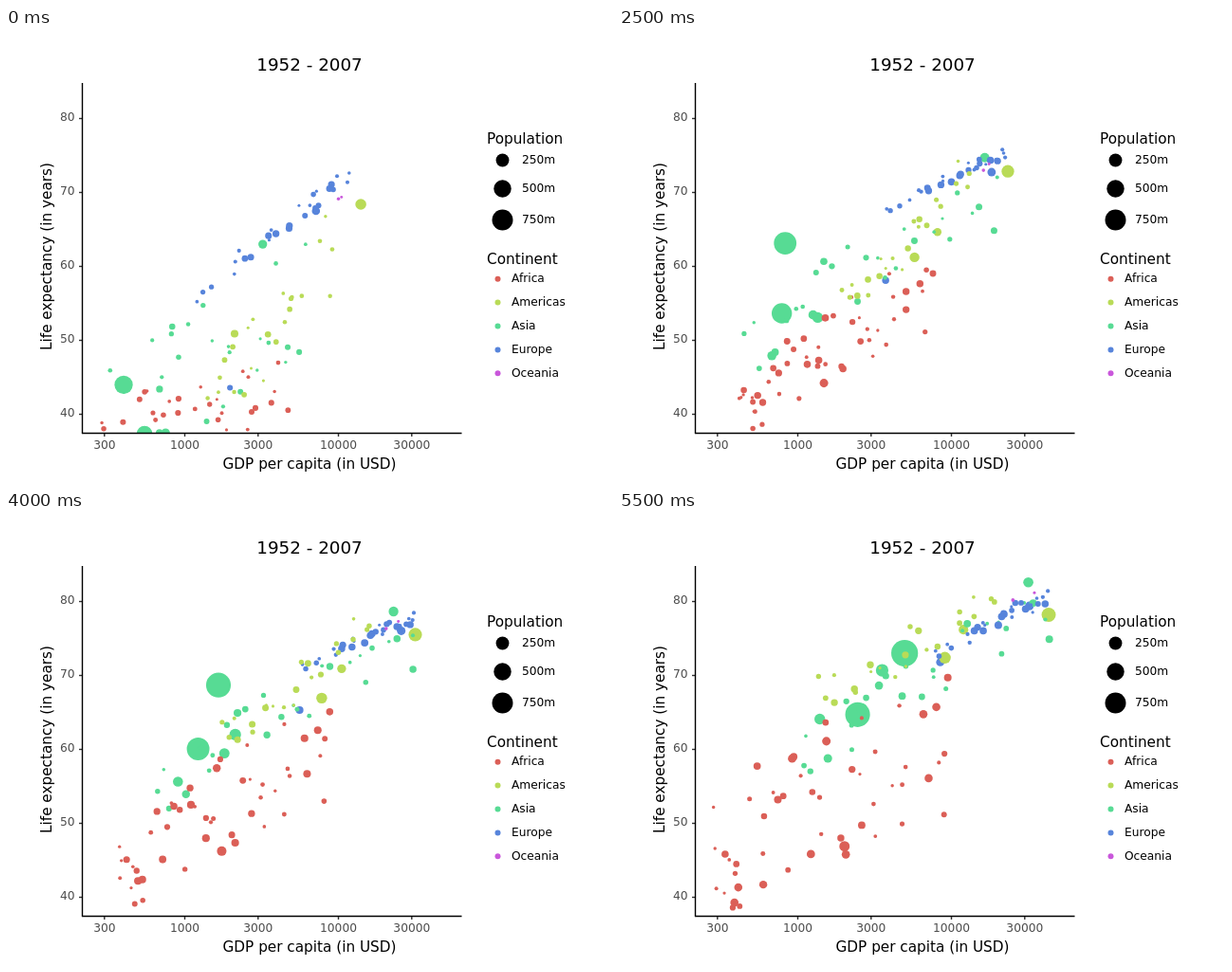
Animation of 640 by 480 pixels, one loop 6000 ms. Source, as an HTML page with a canvas:

```html
<!DOCTYPE html>
<html lang="en">
<head>
<meta charset="utf-8">
<title>Life expectancy and GDP</title>
<style>
html, body { margin: 0; width: 100%; height: 100%; overflow: hidden; background: #fff; }
canvas { display: block; }
</style>
</head>
<body>
<canvas id="stage" width="640" height="480"></canvas>
<script>
const ctx = document.getElementById('stage').getContext('2d');
const STEPS = 12, STEP_MS = 500;
const FONT = '"DejaVu Sans", sans-serif';
const COLORS = { Africa: '#db5f57', Americas: '#b9db57', Asia: '#57db94', Europe: '#5784db', Oceania: '#c957db' };

// The large bubbles: population in millions at both ends, then [step, gdp, life].
const giants = [
  { group: 'Asia', pop: [556, 1319],
    keys: [[0, 400, 44], [1, 576, 50.5], [2, 488, 44.5], [3, 613, 58.4], [6, 962, 65.5], [8, 1656, 68.7], [11, 4959, 73]] },
  { group: 'Asia', pop: [372, 1110],
    keys: [[0, 547, 37.4], [4, 724, 50.7], [6, 856, 56.6], [9, 1459, 61.8], [11, 2452, 64.7]] },
  { group: 'Asia', pop: [82, 224], keys: [[0, 750, 37.5], [6, 1517, 56.2], [11, 3541, 70.7]] },
  { group: 'Asia', pop: [41, 169], keys: [[0, 685, 43.4], [11, 2606, 65.5]] },
  { group: 'Asia', pop: [47, 150], keys: [[0, 684, 37.5], [6, 677, 50], [11, 1391, 64.1]] },
  { group: 'Asia', pop: [86, 127], keys: [[0, 3217, 63], [4, 14779, 73.4], [11, 31656, 82.6]] },
  { group: 'Europe', pop: [69, 82], keys: [[0, 7144, 67.5], [6, 22032, 73.8], [11, 32170, 79.4]] },
  { group: 'Europe', pop: [22, 71], keys: [[0, 1969, 43.6], [6, 4241, 61], [11, 8458, 71.8]] },
  { group: 'Africa', pop: [33, 135], keys: [[0, 1077, 36.3], [6, 1577, 45.8], [11, 2014, 46.9]] },
  { group: 'Americas', pop: [57, 190], keys: [[0, 2109, 50.9], [6, 7031, 63.3], [11, 9066, 72.4]] },
  { group: 'Americas', pop: [30, 109], keys: [[0, 3478, 50.8], [6, 9611, 67.4], [11, 11978, 76.2]] },
  { group: 'Americas', pop: [157, 301], keys: [[0, 13990, 68.4], [11, 42952, 78.2]] }
];

// All other countries, spread from the poorest to the richest of their continent.
// Keys: [step, log gdp low, high, life low, high, life spread].
const clouds = [
  { group: 'Asia', count: 26, skew: 1, maxPop: 90, growth: 2.5,
    keys: [[0, 2.55, 3.8, 39, 56, 8], [6, 2.65, 4.45, 51, 74, 5], [11, 2.97, 4.68, 59, 80, 4]] },
  { group: 'Europe', count: 28, skew: 0.6, maxPop: 60, growth: 1.3,
    keys: [[0, 2.95, 4.1, 54, 72.5, 1.5], [6, 3.56, 4.45, 69.5, 76, 1.2], [11, 3.77, 4.64, 72, 81, 1]] },
  { group: 'Africa', count: 51, skew: 1.3, maxPop: 80, growth: 3.2,
    keys: [[0, 2.48, 3.65, 36, 42, 6], [6, 2.65, 3.95, 43, 61, 6], [11, 2.45, 4.05, 46, 62, 10]] },
  { group: 'Americas', count: 22, skew: 1, maxPop: 45, growth: 2.4,
    keys: [[0, 3.15, 3.95, 41, 63, 8], [6, 3.3, 4.15, 57, 74, 4], [11, 3.1, 4.3, 67, 79, 3]] },
  { group: 'Oceania', count: 2, skew: 1, maxPop: 20, growth: 2,
    keys: [[0, 3.99, 4.03, 69, 69.5, 0], [6, 4.23, 4.31, 73.3, 75.2, 0], [11, 4.33, 4.61, 79.7, 81.7, 0]] }
];

const lerp = (a, b, t) => a + (b - a) * t;
const xOf = logGdp => 188.5 + 162 * (logGdp - 3);
const yOf = life => 407.5 - 7.8 * (life - 40);
const radius = pop => 1.4 + 0.35 * Math.sqrt(pop);

let seed = 29;
function rand(lo, hi) {
  seed = (seed * 16807) % 2147483647;
  return lerp(lo, hi, seed / 2147483647);
}

// Values of a key list at a step, without the step itself.
function sample(keys, step) {
  const next = Math.max(1, keys.findIndex(key => key[0] >= step));
  const a = keys[next - 1], b = keys[next];
  const t = (step - a[0]) / (b[0] - a[0]);
  return a.slice(1).map((v, i) => lerp(v, b[i + 1], t));
}

for (const g of giants) {
  g.keys = g.keys.map(([step, gdp, life]) => [step, Math.log10(gdp), life]);
}
for (const c of clouds) {
  c.dots = Array.from({ length: c.count }, (_, i) => ({
    rank: ((i + 0.5) / c.count) ** c.skew,
    shift: [rand(-0.06, 0.06), rand(-0.06, 0.06)],
    offset: [rand(-1, 1), rand(-1, 1)],
    pop: c.maxPop * rand(0.05, 1) ** 2.2
  }));
}

function disc(x, y, r, color) {
  ctx.fillStyle = color;
  ctx.beginPath();
  ctx.arc(x, y, r, 0, 2 * Math.PI);
  ctx.fill();
}

function bubble(logGdp, life, pop, group) {
  if (life >= 37.3) disc(xOf(logGdp), yOf(life), radius(pop), COLORS[group]);
}

function text(str, x, y, size, align = 'left', color = '#000') {
  ctx.font = `${size}px ${FONT}`;
  ctx.textAlign = align;
  ctx.fillStyle = color;
  ctx.fillText(str, x, y);
}

function line(x0, y0, x1, y1, color) {
  ctx.strokeStyle = color;
  ctx.lineWidth = 1.4;
  ctx.beginPath();
  ctx.moveTo(x0, y0);
  ctx.lineTo(x1, y1);
  ctx.stroke();
}

function drawBubbles(step) {
  const t = step / (STEPS - 1);
  ctx.save();
  ctx.beginPath();
  ctx.rect(80, 58, 400, 369.5);
  ctx.clip();
  for (const g of giants) {
    const [logGdp, life] = sample(g.keys, step);
    bubble(logGdp, life, lerp(...g.pop, t), g.group);
  }
  for (const c of clouds) {
    const [poor, rich, low, high, spread] = sample(c.keys, step);
    const size = lerp(1 / c.growth, 1, t);
    for (const d of c.dots) {
      const shift = c.count > 2 ? lerp(...d.shift, t) : 0;
      const life = lerp(low, high, d.rank) + spread * lerp(...d.offset, t);
      bubble(lerp(poor, rich, d.rank) + shift, life, d.pop * size, c.group);
    }
  }
  ctx.restore();
}

function drawAxes() {
  for (const v of [300, 1000, 3000, 10000, 30000]) {
    const x = xOf(Math.log10(v));
    line(x, 427.5, x, 431, '#333');
    text(v, x, 444, 12.22, 'center', '#4d4d4d');
  }
  for (const v of [40, 50, 60, 70, 80]) {
    const y = yOf(v);
    line(77, y, 80.5, y, '#333');
    text(v, 72.5, Math.floor(y + 3), 12.22, 'right', '#4d4d4d');
  }
  line(80.5, 58, 80.5, 428, '#000');
  line(80, 427.5, 480.5, 427.5, '#000');
  text('1952 - 2007', 320, 45, 18.33, 'center');
  text('GDP per capita (in USD)', 320, 465, 15.28, 'center');
  ctx.save();
  ctx.translate(48, 241);
  ctx.rotate(-Math.PI / 2);
  text('Life expectancy (in years)', 0, 0, 15.28, 'center');
  ctx.restore();
}

function drawLegend() {
  text('Population', 507, 122, 15.28);
  [[250, 139.5], [500, 169.5], [750, 202.5]].forEach(([pop, y]) => {
    disc(523.5, y, radius(pop), '#000');
    text(pop + 'm', 544, Math.floor(y + 4), 12.22);
  });
  text('Continent', 507, 249, 15.28);
  Object.keys(COLORS).forEach((name, i) => {
    const y = 264.7 + 24.9 * i;
    disc(518.5, y, 3, COLORS[name]);
    text(name, 533, Math.floor(y + 4), 12.22);
  });
}

function draw(now) {
  ctx.fillStyle = '#fff';
  ctx.fillRect(0, 0, 640, 480);
  drawBubbles(Math.floor(now / STEP_MS) % STEPS);
  drawAxes();
  drawLegend();
}

const start = performance.now();
function tick() {
  draw(performance.now() - start);
  requestAnimationFrame(tick);
}
tick();
</script>
</body>
</html>
```
